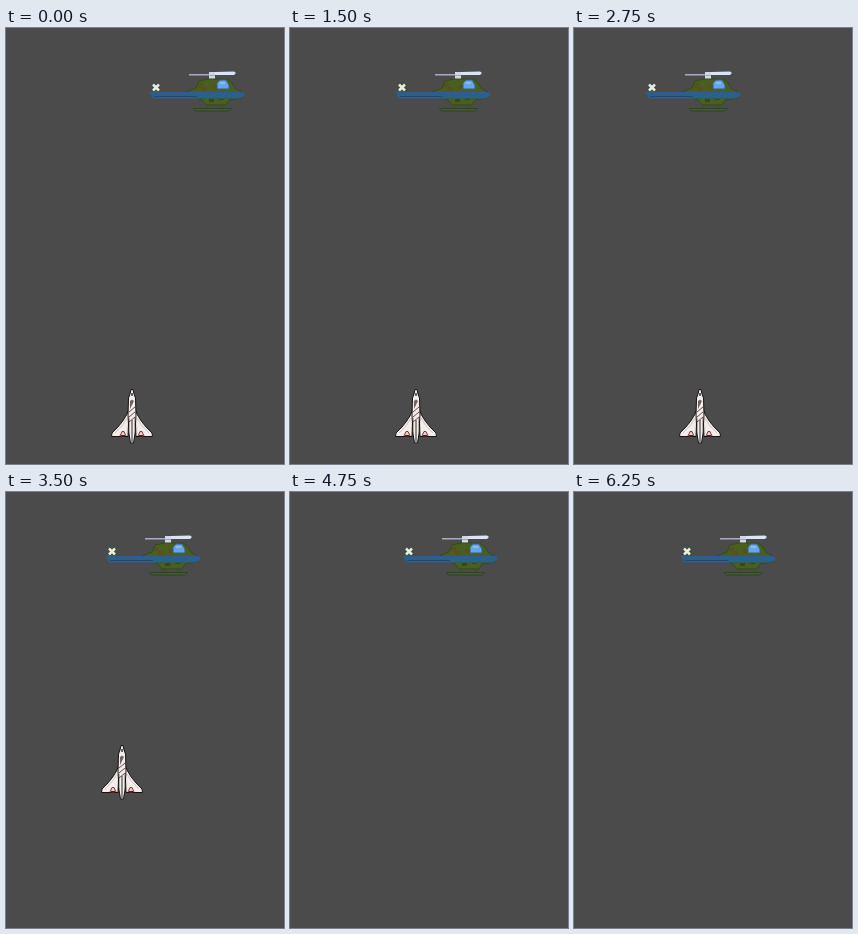
These frames come from a looping animation (278 px wide and 436 px high, 6.5 s). An HTML page with a canvas:

```html
<!DOCTYPE html>
<html lang="en">
<head>
<meta charset="utf-8">
<title>Helicopter and jet</title>
<style>
html, body { margin: 0; width: 100%; height: 100%; overflow: hidden; background: #4b4b4b; }
canvas { display: block; width: 278px; height: 436px; }
</style>
</head>
<body>
<canvas id="stage" width="278" height="436"></canvas>
<script>
const ctx = document.getElementById('stage').getContext('2d');
const STEP = 250, TICKS = 26;
const LAUNCH = 11, JET_GONE = 18;

// Patrol turning points: [tick, x]
const patrol = [
  [0, 144], [2, 47], [3, 21], [5, 142], [8, 34], [10, 129], [12, 15],
  [14, 100], [15, 126], [17, 0], [19, 113], [20, 126], [23, 1], [25, 107]
];

function patrolX(tick) {
  const i = Math.max(1, patrol.findIndex(p => p[0] >= tick));
  const [t0, x0] = patrol[i - 1], [t1, x1] = patrol[i];
  return Math.round(x0 + (x1 - x0) * (tick - t0) / (t1 - t0));
}

function rect(color, x, y, w, h) {
  ctx.fillStyle = color;
  ctx.fillRect(x, y, w, h);
}

function shape(path, fill, stroke, width = 1) {
  const p = new Path2D(path);
  if (fill) {
    ctx.fillStyle = fill;
    ctx.fill(p);
  }
  if (stroke) {
    ctx.strokeStyle = stroke;
    ctx.lineWidth = width;
    ctx.stroke(p);
  }
}

function at(x, y, paint) {
  ctx.save();
  ctx.translate(x, y);
  paint();
  ctx.restore();
}

function mirrored(paint) {
  for (const side of [1, -1]) {
    ctx.save();
    ctx.scale(side, 1);
    paint();
    ctx.restore();
  }
}

function helicopter() {
  // Main rotor
  rect('#a9a9cc', 39, 46, 20, 1.5);
  shape('M65 44 L84 43.5 L86 45 L84 47 H65 Z', '#dbe5f8');
  rect('#d3d6e4', 59, 44, 6, 7);
  rect('#a3a7b8', 59, 47, 6, 1);

  // Cabin, hull and camouflage
  const hull = 'M36 64 L46 60 L49 53 L58 51 H77 L81 54 L86 61 L92 64 V70 ' +
    'L79 72 L76 77 H56 L52 72 L47 70 Z';
  shape(hull, '#48601e', '#35481f');
  for (let i = 0; i < 6; i++) {
    const x = 48 + i * 7 % 24, y = 55 + i * 11 % 20;
    rect(i % 2 ? '#33481b' : '#5b4d1d', x, y, 5, 4);
  }

  // Windscreen
  shape('M67 61 V55 L70 52 H76 L79 57 V61 Z', '#65a5e8', '#335f83');
  rect('#8bbdf0', 70, 54, 5, 2);

  // Boom and belly stripe
  shape('M0 64 L3 63 L8 64 H93 L95 67 L90 70.5 H3 Z', '#2b5f8c');
  rect('#28486a', 4, 68, 43, 1);
  rect('#315c55', 47, 70, 36, 1);

  // Skids
  shape('M60 76 L57 80 M71 76 L74 80', null, '#3b5220', 2);
  shape('M43.5 80.5 H81.5 L79 83 H45 Z', '#485b2c', '#2d4226');

  // Tail rotor
  shape('M2.5 56 L9.5 63 M9.5 56 L2.5 63', null, '#3c4a38', 4);
  shape('M3 56.5 L9 62.5 M9 56.5 L3 62.5', null, '#e9eedd', 2.5);
}

function jet() {
  // Delta wings
  mirrored(() => {
    shape('M3 20 Q7 32 20 44 L20.5 47.5 H4 Z', '#f3eeec', '#171112');
    shape('M5 29 Q8 36 17 44', null, '#cfc4c3');
    shape('M6 47 L8 42.5 H10 L12 47', '#e6d3d1', '#7d3434');
    rect('#4b2021', 7, 46, 4, 2);
  });

  // Fuselage
  mirrored(() => {
    shape('M0 .5 H1 L2 5 L3.5 9 L4 26 L3 45 L1.5 54 H0 Z', '#f3eeec');
    shape('M0 .5 H1 L2 5 L3.5 9 L4 26 L3 45 L1.5 54 H0', null, '#171112');
    shape('M2.5 29 V43', null, '#b7aaaa');
  });
  rect('#6f6263', -1, 4, 2, 3);
  shape('M-2 18 V12 L0 10.5 L2 12 L-2 20 Z', '#6f6263');
  for (let y = 18; y < 30; y += 5) {
    shape(`M-3 ${y + 5} L3 ${y}`, null, '#62494b');
  }
  rect('#332a2b', -0.5, 31, 1, 22);
}

function draw(ms) {
  const tick = Math.floor(ms / STEP) % TICKS;
  rect('#4b4b4b', 0, 0, 278, 436);
  if (tick < JET_GONE) {
    const n = Math.max(0, tick - LAUNCH);
    at(Math.round(126 - n * 10 / 3), Math.min(361, 373 - n * 40), jet);
  }
  at(patrolX(tick), 0, helicopter);
}

const start = performance.now();
function frame() {
  draw(performance.now() - start);
  requestAnimationFrame(frame);
}
frame();
</script>
</body>
</html>
```
